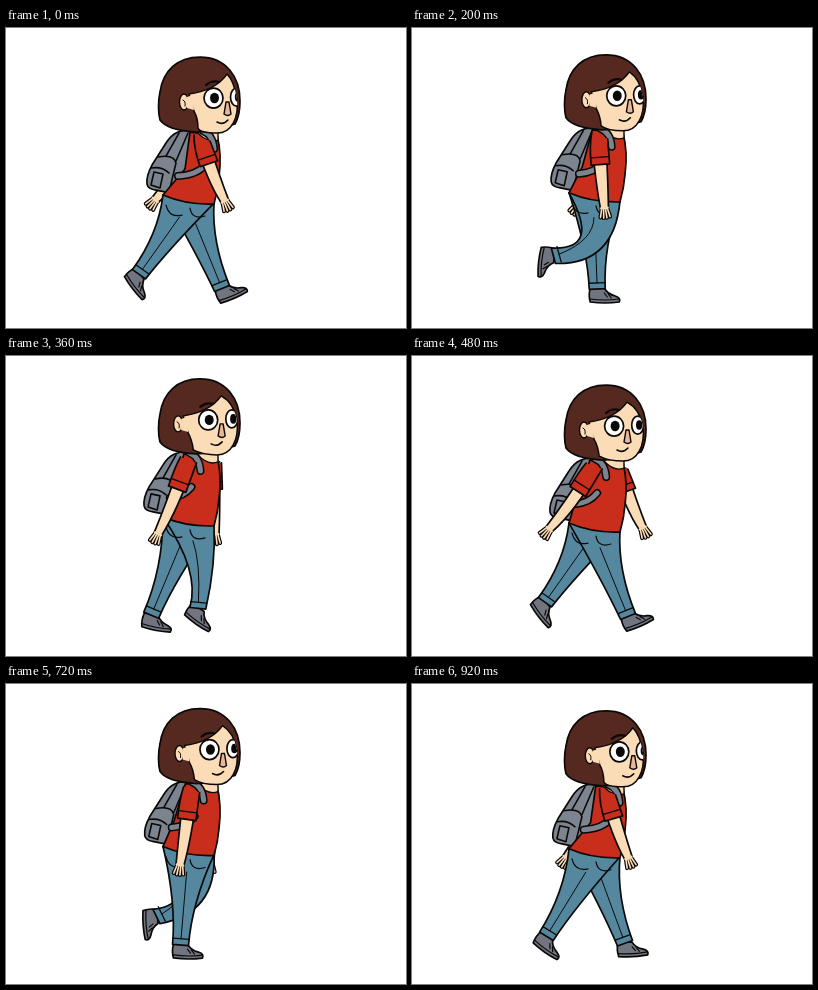
Recreate the animation shown at these times as an HTML page with a canvas. Size 400 px wide and 300 px high, loop 960 ms.

```html
<!DOCTYPE html>
<html lang="en">
<head>
<meta charset="utf-8">
<title>Walk cycle</title>
<style>
html, body { margin: 0; width: 100%; height: 100%; overflow: hidden; background: #fff; }
canvas { display: block; }
</style>
</head>
<body>
<canvas width="400" height="300"></canvas>
<script>
const ctx = document.querySelector('canvas').getContext('2d');
const LOOP = 960, STEP = 40;
const INK = '#0b0908', SKIN = '#fbdcb6', RED = '#c92d1c', DENIM = '#55889f',
      HAIR = '#562920', GREY = '#7c8490', SHOE = '#71757f';

// Cosine wave, and the same wave as a 0..1 bell, peaking at the given time.
const wave = (time, peak = 0, period = LOOP) => Math.cos(2 * Math.PI * (time - peak) / period);
const bell = (time, peak, power) => ((1 + wave(time, peak)) / 2) ** power;

const add = (p, v, s = 1) => [p[0] + v[0] * s, p[1] + v[1] * s];
const mix = (p, q, u) => [p[0] + (q[0] - p[0]) * u, p[1] + (q[1] - p[1]) * u];
function normal(p, q) {
  const dx = q[0] - p[0], dy = q[1] - p[1], len = Math.hypot(dx, dy);
  return [-dy / len, dx / len];
}

function paint(d, fill, width = 1.7, color = INK) {
  const path = new Path2D(d);
  if (fill) { ctx.fillStyle = fill; ctx.fill(path); }
  if (width) { ctx.strokeStyle = color; ctx.lineWidth = width; ctx.stroke(path); }
}

function oval(x, y, rx, ry, fill, width = 1.7) {
  paint(`M${x - rx},${y}a${rx},${ry} 0 1 0 ${2 * rx},0a${rx},${ry} 0 1 0 ${-2 * rx},0Z`, fill, width);
}

// Tapered two-part limb from the edge (left, right) past a joint to its end.
function limb(left, right, joint, end, jointR, endR, fill) {
  const n1 = normal(mix(left, right, .5), end), n2 = normal(joint, end);
  const bend = (a, k, b) => add(k, add(k, mix(a, b, .5), -1), .7);
  const l = add(end, n2, endR), r = add(end, n2, -endR);
  paint(`M${left}Q${bend(left, add(joint, n1, jointR), l)} ${l}L${r}` +
    `Q${bend(right, add(joint, n1, -jointR), r)} ${right}`, fill);
}

function leg(time, bob) {
  const swing = Math.max(0, wave(time, LOOP / 4)), raise = bell(time, 160, 3);
  const heelStrike = Math.max(0, -wave(time)) ** 20;
  const ankle = [174.5 - 41.5 * wave(time) - 24 * swing ** 2, 261 - 35 * raise];
  const angle = 100 * raise ** .75 - 28 * heelStrike;

  const hip = [182, 178 + bob], bone = 42;
  const dist = Math.hypot(ankle[0] - hip[0], ankle[1] - hip[1]);
  const lift = Math.sqrt(Math.max(0, bone * bone - dist * dist / 4));
  const knee = add(mix(hip, ankle, .5), normal(hip, ankle), -lift);

  ctx.save();
  ctx.translate(...ankle);
  ctx.rotate(angle * Math.PI / 180);
  paint('M-7,-1L7,-1Q10,5 18,7Q24,9 22,13Q8,15 -7,13Q-9,6 -7,-1Z', SHOE);
  paint('M-7,10Q8,12 22,10M7,4L10,8M11,5L14,9', null, 1.2);
  ctx.restore();

  limb([157, 168 + bob], [208, 176 + bob], knee, ankle, 11.5, 8, DENIM);
  const n = normal(knee, ankle), cuff = mix(ankle, knee, .14);
  paint(`M${add(cuff, n, 8)}L${add(cuff, n, -8)}`, null, 1.3);
  paint(`M${mix(hip, knee, .35)}Q${mix(hip, knee, .9)} ${cuff}`, null, 1);
}

function arm(shoulder, wrist) {
  const elbow = add(mix(shoulder, wrist, .52), [0, 4]);
  const n = normal(elbow, wrist), along = [n[1], -n[0]];
  for (const [width, color] of [[4, INK], [1.6, SKIN]])
    for (let i = -1.5; i <= 1.5; i++) {
      const root = add(wrist, n, i * 1.8);
      const tip = add(add(wrist, along, 10.5 - Math.abs(i)), n, i * 3.2);
      paint(`M${root}L${tip}`, null, width, color);
    }
  limb(add(shoulder, [-7, 0]), add(shoulder, [7, 0]), elbow, wrist, 6, 4, SKIN);
  paint(`M${add(wrist, n, 3.2)}L${add(wrist, n, -3.2)}`, null, 2.4, SKIN);

  const s = normal(shoulder, elbow), hem = mix(shoulder, elbow, .66);
  const fold = mix(shoulder, elbow, .48);
  paint(`M${add(shoulder, [-7, -5])}Q${add(mix(shoulder, hem, .3), s, 10)} ${add(hem, s, 9.5)}` +
    `L${add(hem, s, -9)}L${add(shoulder, [9, 1])}`, RED);
  paint(`M${add(fold, s, 9)}L${add(fold, s, -8.5)}`, null, 1.3);
}

function backpack(turn) {
  ctx.save();
  ctx.translate((turn - 5) * .5, 0);
  paint('M188,103C174,102 166,106 160,116L146,138Q140,149 141,157' +
    'Q142,162 150,163L165,166Q171,164 174,156L187,122Z', GREY);
  paint('M152,130Q168,127 170,136L163,165M145,141Q156,139 163,146' +
    'M148,145L145,158L154,161L157,147ZM173,106L160,129M182,106L170,134', null, 1.6);
  ctx.restore();
}

function head(x) {
  paint('M194,30C220,30 234,50 234,74C234,87 232,92 229,97L205,104L190,105' +
    'C172,104 159,100 154,93C152,86 152,74 154,65C157,44 171,30 194,30Z', HAIR);
  const face = `M${178 + x},67Q${205 + x},63 ${216 + x},47Q228,54 231,72C233,90 226,106 211,106` +
    `C200,106 193,104 ${188 + x * .8},101Q${187 + x},91 ${183 + x},84Z`;
  paint(face, SKIN, 1.5);
  oval(173 + x, 75, 4.5, 8, SKIN, 1.4);
  paint(`M${176 + x},70L${182 + x},68L${183 + x},83L${176 + x},81Z`, SKIN, 0);
  paint(`M${172 + x},73Q${175 + x},74 ${174 + x},79`, null, 1);

  ctx.save();
  ctx.clip(new Path2D(face));
  const right = 226.5 + x * .8;
  oval(right, 70, 6, 9, '#fff');
  oval(right + 1.5, 70, 3.2, 4.8, INK, 0);
  ctx.restore();
  oval(203 + x * .9, 71, 9.5, 10, '#fff');
  oval(204 + x * .9, 71, 4.5, 5.2, INK, 0);
  paint(`M${195 + x},58Q${201 + x},53 ${208 + x},55`, null, 2.2);
  paint(`M${215 + x},75L${213 + x},87Q${217 + x},90 ${220 + x},87L${218 + x},75Z`, '#e9b797', 1.4);
  paint(`M${206 + x},95Q${212 + x},98.5 ${217 + x},93`, null, 1.6);
}

function draw(time) {
  const bob = 4.5 * wave(time, 80, LOOP / 2) - 3.2;
  const turn = 6 * bell(time, 0, 2) - 1;
  const shoulderX = 183.5 + turn * 2.3;
  const near = wave(time, 15), far = wave(time, 50);
  ctx.fillStyle = '#fff';
  ctx.fillRect(0, 0, 400, 300);
  ctx.lineCap = ctx.lineJoin = 'round';

  arm([388 - shoulderX, 113 + bob], [190 - 43 * far, 180 - 9 * far ** 2]);
  leg(time + LOOP / 2, bob);
  leg(time, bob);

  ctx.save();
  ctx.translate(0, bob);
  paint('M160,178Q163,191 176,188M184,181Q186,193 199,189', null, 1.2);
  backpack(turn);
  paint(`M${179 + turn},105L${167 + turn * 2.4},142L157,168Q180,178 208,177` +
    'Q212,163 213,150Q216,127 211,108Z', RED);
  paint('M190,100L212,100L212,113Q202,117 192,106Z', SKIN, 1.4);
  const strap = `M${shoulderX + 2},104Q${shoulderX + 12},108 ${shoulderX + 13},122`;
  const lower = `M${165 + turn * 1.4},149Q${shoulderX - 4},148 ${shoulderX + 4},138`;
  for (const [width, color] of [[8, INK], [5, GREY]]) paint(strap + lower, null, width, color);
  ctx.restore();

  arm([shoulderX, 113 + bob], [178 + 41 * near, 181 - 8 * near ** 2]);
  ctx.save();
  ctx.translate(0, bob);
  head(turn);
  ctx.restore();
}

const start = performance.now();
function tick() {
  const elapsed = performance.now() - start;
  draw(Math.floor(elapsed / STEP) * STEP % LOOP);
  requestAnimationFrame(tick);
}
tick();
</script>
</body>
</html>
```
